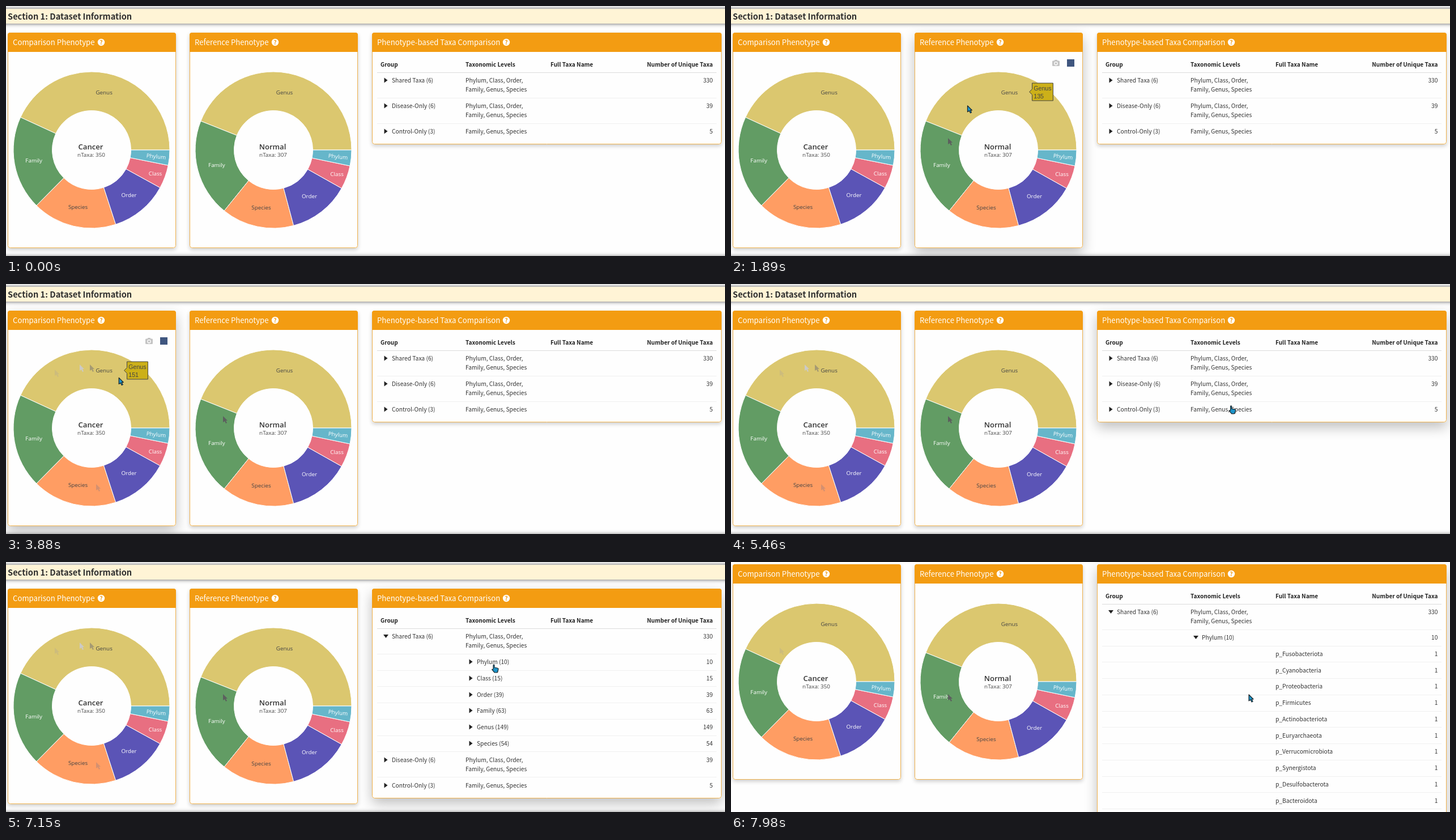
Animation, 1269 px wide and 441 px high, one loop 8 s. Source, as an HTML page with a canvas:

```html
<!DOCTYPE html>
<html lang="en">
<head>
<meta charset="utf-8">
<title>Dataset Information</title>
<style>
  html, body { margin: 0; width: 100%; height: 100%; overflow: hidden; background: #fefefe; }
  canvas { display: block; }
</style>
</head>
<body>
<canvas id="stage" width="1269" height="441"></canvas>
<script>
const ctx = document.getElementById('stage').getContext('2d');
const LOOP = 8000;
const UI = '"Noto Sans CJK SC", "Noto Sans CJK JP", "Noto Sans", sans-serif';
const CHART = '"Open Sans", sans-serif';
const TIP = '"Liberation Sans", sans-serif';
const ORANGE = '#f39c12';
const RADIUS = 138, HOLE = 69.5, CENTER_Y = 254;

// name, slice colour, tooltip colour, label colour; counter-clockwise from the right
const SLICES = [
  ['Genus', '#dbc76f', '#ccb019', '#444'],
  ['Family', '#629c64', '#207322', '#fff'],
  ['Species', '#ff9d63', '#ff7106', '#444'],
  ['Order', '#5b54b6', '#170d96', '#fff'],
  ['Class', '#e86f81', '#de2d47', '#fff'],
  ['Phylum', '#66b6ca', '#2095b0', '#fff']
];

const charts = [
  { x: 3, title: 'Comparison Phenotype', iconX: 168, cx: 151, name: 'Cancer', counts: [151, 68, 61, 42, 17, 11], hover: [[2760, 4240]] },
  { x: 324, title: 'Reference Phenotype', iconX: 475, cx: 472, name: 'Normal', counts: [135, 62, 46, 39, 15, 10], hover: [[870, 2740], [4290, 4930]] }
];
for (const chart of charts) {
  chart.total = chart.counts.reduce((a, b) => a + b);
  let start = 0;
  chart.slices = SLICES.map(([name, color, tipColor, ink], i) => {
    const sweep = chart.counts[i] / chart.total * Math.PI * 2;
    const mid = start + sweep / 2;
    const inner = Math.min(1 / (1 + 1 / Math.sin(Math.min(sweep, Math.PI) / 2)), 0.25);
    const slice = { name, color, tipColor, ink, count: chart.counts[i], start, end: start + sweep, mid, inner };
    start += sweep;
    return slice;
  });
}

const PHYLA = ['Fusobacteriota', 'Cyanobacteria', 'Proteobacteria', 'Firmicutes', 'Actinobacteriota',
  'Euryarchaeota', 'Verrucomicrobiota', 'Synergistota', 'Desulfobacterota', 'Bacteroidota'];
const SHARED = [['Phylum', 10], ['Class', 15], ['Order', 39], ['Family', 63], ['Genus', 149], ['Species', 54]];
const OPEN_SHARED = 6560, OPEN_PHYLUM = 7490;
const TABLE_HOVER = [[4970, 9000]];

// time, x, y of the pointer tip
const PATH = [
  [130, 978, 310], [700, 670, 322], [1000, 585, 296], [1330, 460, 355], [1730, 383, 233],
  [1890, 417, 176], [2050, 490, 145], [2350, 591, 264], [2500, 586, 303], [2740, 326, 364],
  [2990, 159, 352], [3330, 55, 235], [3480, 86, 151], [3700, 148, 142], [3880, 199, 165],
  [4160, 266, 290], [4930, 622, 250], [5460, 883, 215], [5800, 738, 169], [6080, 738, 125],
  [6300, 738, 125], [6350, 739, 117], [6550, 739, 117], [7150, 861, 181], [7490, 860, 174],
  [7880, 914, 234], [LOOP, 914, 234]
];

// pointer marks left on the screen: x, y, colour, from, until
const TRAILS = [
  [383, 233, '#5c5f5e', 1760, LOOP],
  [159, 353, '#d49070', 3090, 7840],
  [86, 151, '#cdbc7c', 3560, LOOP],
  [130, 142, '#cccac4', 3680, 7840],
  [148, 142, '#a59a72', 3770, 7840]
];

const arrow = new Path2D('M0 0V11L3 9L5 13L7 12L5 8H8Z');
const hand = new Path2D('M-1 1Q0 -1 1 1V5L6 6Q8 6 8 8L7 12Q7 14 5 14H1L-3 9Q-4 8 -1 8Z');

const clamp = v => Math.max(0, Math.min(1, v));
const ease = v => v * v * (3 - 2 * v);
const fade = (spans, t) => Math.max(...spans.map(([on, off]) => clamp((t - on) / 300) * (1 - clamp((t - off) / 300))));

function text(str, x, y, size, family, color, align = 'left', weight = 400) {
  ctx.font = `${weight} ${size}px ${family}`;
  ctx.fillStyle = color;
  ctx.textAlign = align;
  ctx.fillText(str, x, y);
}

function rule(y, color) {
  ctx.fillStyle = color;
  ctx.fillRect(655, y, 599, 1);
}

function pointerAt(t) {
  if (t < PATH[0][0]) return null;
  const i = PATH.findIndex(p => p[0] > t);
  const [t0, x0, y0] = PATH[i - 1], [t1, x1, y1] = PATH[i];
  const k = (t - t0) / (t1 - t0);
  return { x: x0 + (x1 - x0) * k, y: y0 + (y1 - y0) * k };
}

function sectionBar(y) {
  ctx.save();
  ctx.shadowColor = '#555';
  ctx.shadowBlur = 7;
  ctx.fillStyle = '#fff4d6';
  ctx.fillRect(-10, y, 1289, 26);
  ctx.restore();
}

function card(x, w, bottom, title, iconX, lift) {
  ctx.save();
  ctx.shadowColor = `rgba(0,0,0,${0.2 + 0.05 * lift})`;
  ctx.shadowOffsetY = 3 + 6 * lift;
  ctx.shadowBlur = 7 + 15 * lift;
  ctx.fillStyle = '#fefefe';
  ctx.beginPath();
  ctx.roundRect(x, 47, w, bottom - 47, 4);
  ctx.fill();
  ctx.restore();
  ctx.strokeStyle = '#f0b24c';
  ctx.lineWidth = 1;
  ctx.beginPath();
  ctx.roundRect(x + 0.5, 47.5, w - 1, bottom - 48, 4);
  ctx.stroke();
  ctx.fillStyle = ORANGE;
  ctx.beginPath();
  ctx.roundRect(x, 47, w, 34, [4, 4, 0, 0]);
  ctx.fill();
  text(title, x + 9, 69, 13.18, UI, '#fff');
  ctx.beginPath();
  ctx.arc(iconX, 64, 6.2, 0, 7);
  ctx.fill();
  text('?', iconX, 68, 10.5, UI, ORANGE, 'center', 700);
}

function toolbar(x, opacity) {
  ctx.save();
  ctx.globalAlpha = opacity;
  ctx.fillStyle = '#c4c4c4';
  ctx.beginPath();
  ctx.roundRect(x + 243, 96.5, 13, 9.5, 1.5);
  ctx.rect(x + 247, 95, 5, 2);
  ctx.fill();
  ctx.strokeStyle = '#fefefe';
  ctx.lineWidth = 1.3;
  ctx.beginPath();
  ctx.arc(x + 249.5, 101.3, 2.7, 0, 7);
  ctx.stroke();
  ctx.fillStyle = '#3f567f';
  ctx.fillRect(x + 269, 94, 13, 13);
  ctx.restore();
}

function donut({ cx, slices, name, total }) {
  ctx.strokeStyle = '#fff';
  ctx.lineWidth = 1;
  for (const s of slices) {
    ctx.beginPath();
    ctx.arc(cx, CENTER_Y, RADIUS, -s.start, -s.end, true);
    ctx.arc(cx, CENTER_Y, HOLE, -s.end, -s.start);
    ctx.closePath();
    ctx.fillStyle = s.color;
    ctx.fill();
    ctx.stroke();
  }
  for (const s of slices) {
    const thin = s.name === 'Phylum';
    const r = RADIUS * (thin ? 0.83 : 1 - s.inner);
    ctx.save();
    ctx.translate(cx + r * Math.cos(s.mid), CENTER_Y - r * Math.sin(s.mid));
    if (thin) ctx.rotate(-s.mid);
    text(s.name, 0, 3.6, 9.84, CHART, s.ink, 'center');
    ctx.restore();
  }
  text(name, cx - 1.5, 253, 13.1, CHART, '#333', 'center', 600);
  text(`nTaxa: ${total}`, cx - 0.5, 265.5, 9.84, CHART, '#444', 'center');
}

function tooltip(chart, pointer) {
  const dx = pointer.x - chart.cx, dy = CENTER_Y - pointer.y;
  const dist = Math.hypot(dx, dy);
  if (dist < HOLE || dist > RADIUS) return;
  const angle = (Math.atan2(dy, dx) + Math.PI * 2) % (Math.PI * 2);
  const s = chart.slices.find(p => angle <= p.end) || chart.slices[5];
  ctx.font = `10.66px ${TIP}`;
  const w = ctx.measureText(s.name).width + 5.5;
  const midX = chart.cx + RADIUS * (1 - s.inner) * Math.cos(s.mid);
  const y = Math.round(CENTER_Y - RADIUS * (1 - s.inner) * Math.sin(s.mid)) - 0.5;
  const reach = RADIUS * s.inner;
  // prefer the outer side, flip when the card has no room
  let side = Math.cos(s.mid) >= 0 ? 1 : -1;
  const edge = midX + side * (reach + w + 5);
  if (edge < chart.x || edge > chart.x + 296) side = -side;
  const tip = Math.round(midX + side * reach) + 0.5;
  const near = tip + side * 5, far = near + side * w;
  ctx.beginPath();
  ctx.moveTo(near, y + 5);
  ctx.lineTo(tip, y);
  ctx.lineTo(near, y - 5);
  for (const [px, py] of [[near, -1], [far, -1], [far, 1], [near, 1]]) ctx.lineTo(px, y + py * 15.5);
  ctx.closePath();
  ctx.fillStyle = s.tipColor;
  ctx.fill();
  ctx.strokeStyle = '#444';
  ctx.lineWidth = 1;
  ctx.stroke();
  const align = side > 0 ? 'left' : 'right';
  text(s.name, near + side * 2.7, y - 2.5, 10.66, TIP, s.ink, align);
  text(s.count, near + side * 2.7, y + 11, 10.66, TIP, s.ink, align);
}

function tableRows(sharedOpen, phylumOpen) {
  const all = ['Phylum, Class, Order,', 'Family, Genus, Species'];
  const rows = [{ x: 681, label: 'Shared Taxa (6)', levels: all, count: 330, open: sharedOpen }];
  if (sharedOpen) {
    SHARED.forEach(([name, count], i) => {
      const open = phylumOpen && i === 0;
      rows.push({ x: 831, label: `${name} (${count})`, levels: [], count, open });
      if (open) PHYLA.forEach(p => rows.push({ x: 961, label: 'p_' + p, levels: [], count: 1, leaf: true }));
    });
  }
  rows.push({ x: 681, label: 'Disease-Only (6)', levels: all, count: 39 },
    { x: 681, label: 'Control-Only (3)', levels: all.slice(1), count: 5 });
  for (const row of rows) row.height = row.levels.length > 1 ? 44.9 : 28.75;
  return rows;
}

function disclosure(x, y, open) {
  ctx.save();
  ctx.translate(x, y);
  if (open) ctx.rotate(Math.PI / 2);
  ctx.fillStyle = '#222';
  ctx.beginPath();
  ctx.moveTo(-3, -4.5);
  ctx.lineTo(3, 0);
  ctx.lineTo(-3, 4.5);
  ctx.fill();
  ctx.restore();
}

function table(rows, bottom, lift) {
  card(646, 617, bottom, 'Phenotype-based Taxa Comparison', 883, lift);
  const head = (str, x, align) => text(str, x, 107, 10.1, UI, '#222', align, 600);
  const cell = (str, x, y, align) => text(str, x, y, 10.25, UI, '#333', align);
  head('Group', 661);
  head('Taxonomic Levels', 811);
  head('Full Taxa Name', 961);
  head('Number of Unique Taxa', 1247.5, 'right');
  rule(117, '#dcdcdc');
  let y = 117;
  rows.forEach((row, i) => {
    if (i) rule(Math.round(y), '#f0f0f0');
    const base = Math.round(y + 18.3);
    if (!row.leaf) disclosure(row.x - 10.5, base - 4, row.open);
    cell(row.label, row.x, base);
    row.levels.forEach((line, n) => cell(line, 811, base + n * 16.2));
    cell(row.count, 1247.5, base, 'right');
    y += row.height;
  });
}

function pointerShape(pointer, isHand) {
  const shape = isHand ? hand : arrow;
  ctx.save();
  ctx.translate(pointer.x, pointer.y);
  ctx.fillStyle = '#1c93c8';
  ctx.strokeStyle = '#1a2226';
  ctx.lineWidth = 1.2;
  ctx.lineJoin = 'round';
  ctx.fill(shape);
  ctx.stroke(shape);
  ctx.restore();
}

function draw(t) {
  const pointer = pointerAt(t);
  const phylumOpen = t >= OPEN_PHYLUM;
  const scroll = Math.round(43 * ease(clamp((t - 7830) / 145)));
  const rows = tableRows(t >= OPEN_SHARED, phylumOpen);
  const tableBottom = Math.round(117 + rows.reduce((sum, r) => sum + r.height, 0) + 8.5);

  ctx.fillStyle = '#fefefe';
  ctx.fillRect(0, 0, 1269, 441);
  ctx.save();
  ctx.translate(0, -scroll);
  sectionBar(5);
  text('Section 1: Dataset Information', 3, 24, 14.64, UI, '#2f2f2f', 'left', 700);
  for (const chart of charts) {
    const lift = fade(chart.hover, t);
    card(chart.x, 297, 427, chart.title, chart.iconX, lift);
    toolbar(chart.x, lift);
    donut(chart);
  }
  table(rows, tableBottom, fade(TABLE_HOVER, t));
  sectionBar(Math.max(427, tableBottom) + 15);
  ctx.restore();

  for (const [x, y, color, from, until] of TRAILS) {
    if (t < from || t >= until) continue;
    ctx.save();
    ctx.translate(x, y);
    ctx.fillStyle = color;
    ctx.fill(arrow);
    ctx.restore();
  }
  if (!pointer) return;
  charts.forEach(chart => tooltip(chart, pointer));
  const overLeaf = phylumOpen && pointer.y + scroll > 191;
  pointerShape(pointer, t > 4970 && pointer.x > 646 && !overLeaf);
}

function frame(now) {
  draw(now % LOOP);
  requestAnimationFrame(frame);
}
requestAnimationFrame(frame);
</script>
</body>
</html>
```
